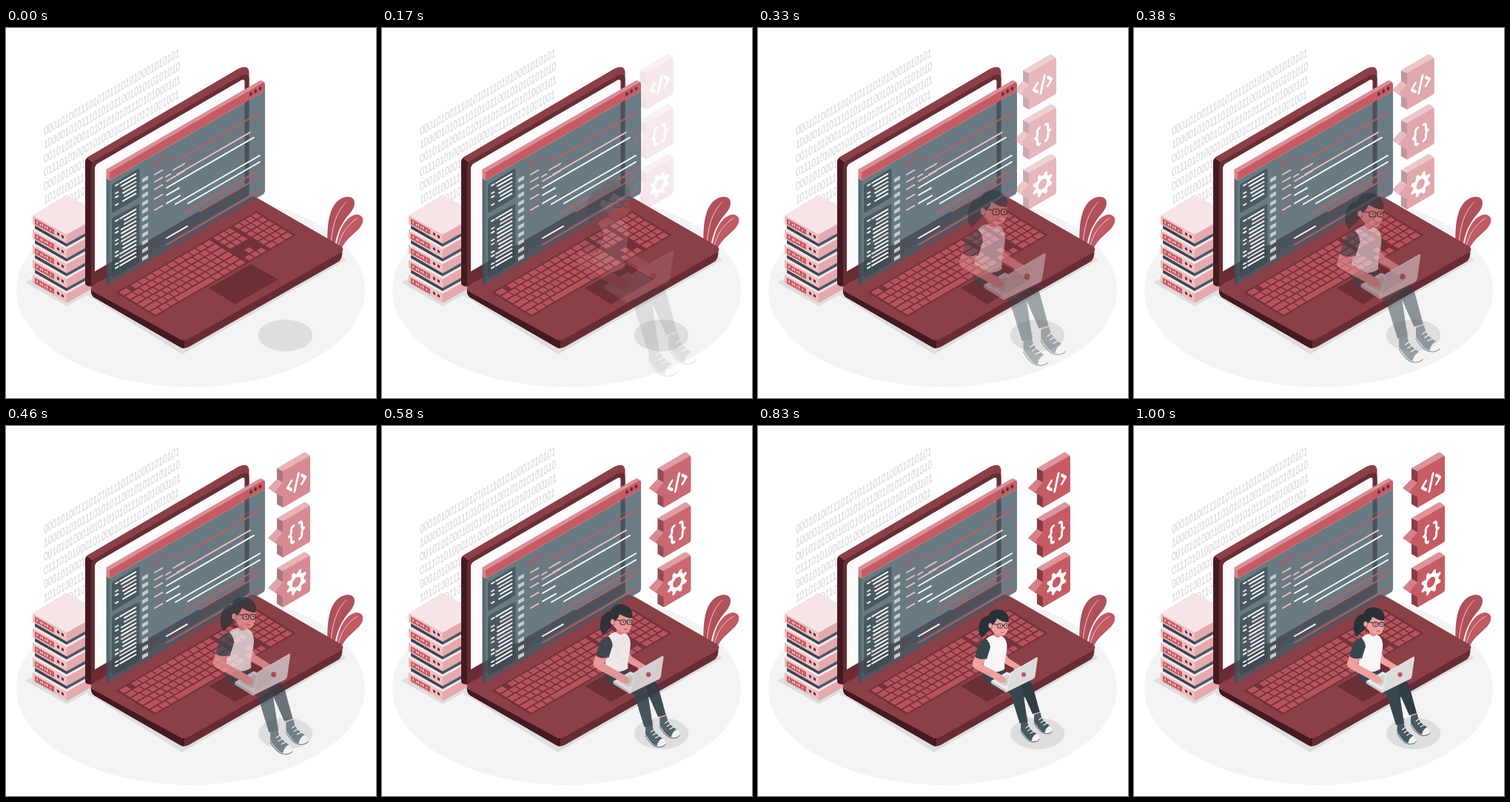
Animation of 500 by 500 pixels, one loop 1.04 s. Source, as an HTML page with a canvas:

```html
<!DOCTYPE html>
<html lang="en">
<head>
<meta charset="utf-8">
<title>Developer at work</title>
<style>
html, body { margin: 0; width: 100%; height: 100%; overflow: hidden; background: #fff; }
canvas { display: block; width: 500px; height: 500px; }
</style>
</head>
<body>
<canvas id="stage" width="500" height="500"></canvas>
<script>
const ISO = 0.577;
const RED = '#c65b64', PINK = '#edbfc3', MAROON = '#8b3f46', WINE = '#672c34', DARK = '#431a20';
const SLATE = '#37474f', SKIN = '#f0a09d', HAIR = '#263238';

function makeCanvas() {
  const c = document.createElement('canvas');
  c.width = c.height = 500;
  return c;
}

let g;
const fill = (d, color) => { g.fillStyle = color; g.fill(new Path2D(d)); };
const stroke = (d, color, w = 1) => {
  g.strokeStyle = color;
  g.lineWidth = w;
  g.lineCap = g.lineJoin = 'round';
  g.stroke(new Path2D(d));
};
const oval = (x, y, rx, ry, color, rot = 0) => {
  g.fillStyle = color;
  g.beginPath();
  g.ellipse(x, y, rx, ry, rot, 0, Math.PI * 2);
  g.fill();
};
const isoLine = (x, y, x2, color, w = 1.9) =>
  stroke(`M${x} ${y}L${x2} ${y - (x2 - x) * ISO}`, color, w);
function within(matrix, draw) {
  g.save();
  g.transform(...matrix);
  draw();
  g.restore();
}
function random(seed) {
  return () => (seed = (seed * 16807) % 2147483647) / 2147483647;
}

function drawBinary() {
  const rows = [
    '000101001110101011101010001010101', '100001010111010101100101010101010',
    '001010100010101010101110101000101', '011101010001010001011110101001001',
    '000101000101010001010101010100101', '101010011101010001010100010101010',
    '010010011010100101010001010101001'
  ];
  g.fillStyle = g.strokeStyle = '#dcdcdc';
  g.lineWidth = 0.4;
  g.font = '14px "Liberation Sans", Arial, sans-serif';
  rows.forEach((row, i) => within([0.725, -0.425, 0, 1.14, 51.2, 145.5 + i * 18.6], () => {
    g.fillText(row, 0, 0);
    g.strokeText(row, 0, 0);
  }));
}

function drawServer(y) {
  fill(`M36 ${y}L82 ${y + 26}V${y + 38.5}L36 ${y + 12}Z`, '#eebfc2');
  fill(`M82 ${y + 26}L130 ${y - 1}V${y + 11.5}L82 ${y + 38.5}Z`, '#e5a9ae');
  fill(`M82 ${y - 28}L130 ${y - 1}L82 ${y + 26}L36 ${y}Z`, '#f6e4e6');
  within([1, 0.565, 0, 1, 36, y], () => {
    g.fillStyle = RED;
    g.fillRect(3, 2.8, 26, 7.4);
    g.fillStyle = '#f7e2e4';
    [5.5, 10, 12.5, 16, 19, 23.5].forEach((x, i) => g.fillRect(x, 4.6 + (i % 2), 1.3, 3.4 - (i % 2)));
    oval(34.5, 6, 1.7, 2, WINE);
    oval(40.5, 6, 1.7, 2, WINE);
  });
}

function drawServers() {
  fill('M26 344L38 337L120 336V355L82 376Z', '#dfdfdf');
  for (let i = 4; i >= 0; i--) {
    const y = 253 + i * 20;
    drawServer(y);
    if (i) {
      fill(`M39 ${y - 9}L82 ${y + 15}V${y + 22.5}L39 ${y - 2}Z`, SLATE);
      fill(`M82 ${y + 15}L128 ${y - 11}V${y - 3}L82 ${y + 22.5}Z`, '#455a64');
    }
  }
}

function drawPlant() {
  fill('M435 297C433 270 435 231 461 228C474 228 473 240 466 249C454 262 446 277 443 302Z', '#b0505a');
  fill('M446 303C447 276 458 254 474 252C485 253 484 263 478 270C467 282 457 286 450 306Z', '#c05a63');
  stroke('M439 296C440 270 446 248 460 235', '#f3d3d6', 0.9);
  stroke('M448 301C450 282 460 266 475 257', '#f3d3d6', 0.9);
}

// Maps keyboard units (u along, v deep) to the stage.
const keyPoint = (u, v) => `${151 + u * 187 + v * 51} ${357 - u * 108 + v * 31.5}`;
const keyQuad = (u, v, u2, v2, color) =>
  fill(`M${keyPoint(u, v)}L${keyPoint(u2, v)}L${keyPoint(u2, v2)}L${keyPoint(u, v2)}Z`, color);

function keyRow(row, from, to, count) {
  const step = (to - from) / count;
  for (let i = 0; i < count; i++) {
    const u = from + i * step;
    keyQuad(u + 0.004, row / 6 + 0.018, u + step - 0.004, (row + 1) / 6 - 0.018, '#b8535c');
  }
}

function drawKeyboard() {
  keyQuad(-0.01, -0.02, 1.01, 1.02, '#73323b');
  keyRow(0, 0, 0.06, 1);
  keyRow(0, 0.085, 0.66, 11);
  keyRow(0, 0.68, 0.81, 3);
  keyRow(0, 0.83, 1, 4);
  for (let r = 1; r < 5; r++) {
    const inset = 0.045 + r * 0.012;
    keyRow(r, 0, inset, 1);
    keyRow(r, inset, 0.585, 11);
    keyRow(r, 0.585, 0.66, 1);
    keyRow(r, 0.83, 1, 4);
  }
  keyRow(1, 0.68, 0.81, 3);
  keyRow(2, 0.68, 0.81, 3);
  keyRow(4, 0.723, 0.767, 1);
  keyRow(5, 0, 0.17, 3);
  keyRow(5, 0.17, 0.44, 1);
  keyRow(5, 0.44, 0.66, 4);
  keyRow(5, 0.68, 0.81, 3);
  keyRow(5, 0.83, 1, 3);
}

function drawLaptop() {
  fill('M108 360L238 441L460 313L448 304L238 425L118 352Z', '#dedede');
  drawPlant();
  fill('M115 352Q114 360 119 364L235 431Q241 434 247 431L449 316Q455 312 454.500 300L330 240Z', WINE);
  fill('M115 352Q114 360 119 364L235 431Q238 433 241 433V415Z', DARK);
  fill('M115 352Q115 347 122 344L324 230Q333 225.500 341 230.500L452 294.500Q459 299 452 304L247 420Q240 424 234 420L119 357Q115 355 115 352Z', MAROON);
  drawKeyboard();
  fill('M275 352L331 320L367 340L310 373Z', '#6c2f36');
  stroke('M275 352L331 320L367 340', '#5b242c', 0.8);

  // lid
  fill('M107 181Q107 176.500 112 173.500L314 55Q328 48.500 328.500 60V90L116 349Q107 350 107 344Z', MAROON);
  fill('M107 181Q107 178 109 176L117 182V349Q107 350 107 344Z', DARK);
  fill('M115 349V188Q115 182 120 179L317 65Q328.500 59 328.500 69V226Z', WINE);
  fill('M120 329V190Q120 186 124 183L318 70.500Q322.500 68 322.500 73V212Z', '#fcfcfc');
}

function listing(y, rows, seed) {
  const rnd = random(seed);
  for (let i = 0; i < rows; i++) {
    const top = y + i * 5.3;
    const x = 154 + Math.floor(rnd() * 4) * 2;
    const color = i % 4 === 2 ? '#f3d9db' : '#fff';
    if (i % 3 !== 1) isoLine(148, top, 151.5, color);
    isoLine(x, top - (x - 148) * ISO, 175.5, color);
  }
}

function drawPanel() {
  fill('M140 206L350 85V219Q350 223 347 225L140 346Z', 'rgba(69,90,100,.8)');
  fill('M135.500 203L140 206V346Q135.500 348 135.500 344Z', 'rgba(60,82,92,.85)');
  fill('M135.500 191L344 70.500L350 73.500L140 194.500Z', '#dc8f96');
  fill('M135.500 191L140 194.500V206L135.500 204Z', '#d98188');
  fill('M140 194.500L347 74Q350 73 350 76V85L140 206Z', RED);
  [331, 337.2, 343.4].forEach(x => oval(x, 89 - (x - 331) * ISO, 1.8, 2.7, '#56313c', 0.3));

  const box = 'rgba(55,71,79,.62)';
  fill('M143 214Q143 211 146 209.500L178 190.500Q180.500 189 180.500 192V226Q180.500 229 178 230L146 249Q143 250.500 143 248Z', box);
  fill('M143 260Q143 257 146 255.500L178 238.500Q180.500 237 180.500 240V313Q180.500 316 178 318L146 337Q143 338.500 143 335Z', box);
  listing(213, 6, 71);
  listing(261, 13, 29);
  for (let i = 0; i < 11; i++) {
    const y = 204 + i * 10.6;
    fill(`M184 ${y}L192 ${y - 4.6}V${y + 0.4}L184 ${y + 5}Z`, '#c6cccf');
  }

  within([0.87, -0.5, 0, 1, 207, 180], () =>
    stroke('M-5-4L-9 0L-5 4M2-6L-2 6M5-4L9 0L5 4', '#b9505a', 1.6));
  isoLine(221, 179, 223, RED, 1.5);
  isoLine(226, 176, 229, RED, 1.5);
  isoLine(232, 178.500, 343, RED);
  [198, 208, 218, 231, 246].forEach(y => isoLine(201, y, 211.500, PINK));
  isoLine(216, 201, 222.500, PINK);
  isoLine(226, 192, 241, PINK);
  isoLine(217, 207, 241, PINK);
  isoLine(231, 198, 330, PINK);
  isoLine(217, 216, 335, '#fff');
  isoLine(217, 226, 234, '#fff');
  isoLine(217, 237, 235, '#fff');
  isoLine(229, 238, 343, '#fff');
  isoLine(246, 237, 343, '#fff');
  isoLine(240, 251, 343, RED);
  isoLine(262, 248, 343, RED);
  isoLine(217, 284, 245, '#fff');
  isoLine(217, 293, 343, RED);
}

function drawScene() {
  oval(249.5, 354.5, 235.5, 130.5, '#f4f4f4');
  drawBinary();
  drawServers();
  drawLaptop();
  drawPanel();
  oval(377.5, 415.5, 36.8, 21.5, '#dedede');
}

function drawGear() {
  const pts = [];
  for (let i = 0; i < 32; i++) {
    const a = (i + 1.5) * Math.PI / 16;
    const r = i % 4 < 2 ? 15.8 : 11.5;
    pts.push(`${r * Math.cos(a)} ${r * Math.sin(a)}`);
  }
  const gear = new Path2D('M' + pts.join('L') + 'Z');
  gear.moveTo(6.5, 0);
  gear.arc(0, 0, 6.5, 0, Math.PI * 2);
  g.fillStyle = '#fff';
  g.fill(gear, 'evenodd');
}

const icons = [
  () => stroke('M-8-6L-14 0L-8 6M3-10.500L-3 10.500M8-6L14 0L8 6', '#fff', 3.6),
  () => stroke('M-4.500-11C-10-11-7.500-5-8.500-2.500Q-9.500 0-11.500 0Q-9.500 0-8.500 2.500C-7.500 5-10-11-4.500 11'.replace('-10-11-4.500 11', '-10 11-4.500 11') +
    'M4.500-11C10-11 7.500-5 8.500-2.500Q9.500 0 11.500 0Q9.500 0 8.500 2.500C7.500 5 10 11 4.500 11', '#fff', 3.6),
  drawGear
];

function drawBubbles() {
  icons.forEach((icon, i) => within([1, 0, 0, 1, 0, i * 67.4], () => {
    fill('M375 57L383.500 61V110.500L375 105.500Z', '#873c45');
    fill('M375 57L411 36Q413 35 415 36.500L420 40.500L383.500 61.500Z', '#de949a');
    fill('M383 61L418 41Q420 40 420 43V86Q420 89 418 90L383 110.500Z', RED);
    fill('M363 84L375 71.500L383.500 76.500L371.500 90Z', '#d67f87');
    fill('M383.500 76.500L371.500 90L383.500 96.500Z', RED);
    within([0.87, -0.5, 0, 1, 401.5, 76.3], icon);
  }));
}

function drawShoe(x, y) {
  within([1, 0, 0, 1, x, y], () => {
    fill('M0 0L9-3C10 7 17 12 24 17C28 21 26 26 19 26.500C10 27 5 19 0 12Z', '#f4f4f4');
    fill('M0 0L9-3C10 7 16 11 22 15Q16 18 15 25C9 24 5 17 0 10Z', '#455a64');
    stroke('M0 12C5 20 9 26 18 26.500Q24 26 26 23', SLATE, 0.9);
    stroke('M7 7L11 4M9.500 11L14 8M13 14.500L18 12', '#fff', 1.1);
  });
}

function drawWoman() {
  fill('M314 254C303 252 296 262 297 274C297 280 300 284 301 285C305 279 312 277 314 268Z', HAIR);
  // legs
  fill('M356 395H366L364 408L357 409Z', SKIN);
  fill('M373 386H382L382 397L375 398Z', SKIN);
  drawShoe(355.5, 403.5);
  drawShoe(374, 392);
  fill('M318 333L362 341Q371 345 373 355L382 388L372 391L356 355Z', '#2f3e46');
  fill('M303 325C299 337 306 347 321 353L341 362L354 404L365 402L358 356C352 343 339 334 324 327Z', SLATE);
  // far arm and torso
  fill('M331 300L338 313L357 325L353 331L334 321L327 313Z', SKIN);
  fill('M318 272L328 276L328 284Q324 290 318 283Z', '#df8987');
  fill('M306 288C311 282 315 281 318 281Q322 287 328 282C335 284 337 293 336 300C335 309 332 318 333 328C325 334 311 334 302 328C306 317 303 300 306 288Z', '#f7f7f7');
  fill('M307 286C299 288 296 293 294 302L291 312Q299 318 308 314L313 298Q312 290 307 286Z', SLATE);
  // head
  fill('M312 258L338 259C339 270 337 280 331 282C323 282 315 276 313 270Z', SKIN);
  fill('M310 266C307 251 315 244 325 245C335 246 341 255 338 263C331 263 326 260 322 257C321 263 318 264 316 267L315 272Z', HAIR);
  oval(313, 267.5, 2.7, 3.5, SKIN);
  stroke('M315 265L323 266M330 267H332', '#2a2f38', 1);
  g.strokeStyle = '#2a2f38';
  g.lineWidth = 1;
  for (const [x, w] of [[323, 7], [332, 6]]) {
    g.beginPath();
    g.roundRect(x, 265, w, 6, 2);
    g.stroke();
    oval(x + w / 2 + 0.5, 267.7, 0.8, 1.1, HAIR);
  }
  stroke('M328 277Q330 278 332 277', '#b64c55', 1);
  // small computer
  fill('M313.500 345L336 332L358 342L336 359Z', '#e9e9e9');
  fill('M313.500 345L336 358L335 361L314 348Z', '#c8c8c8');
  fill('M320 345L336 336L349 342L334 352Z', '#cfd2d4');
  // near arm
  fill('M291 311Q299 317 307 313L302 322L326 335Q334 339 335 345Q334 349 328 347L294 329Q286 325 288 320Z', SKIN);
  oval(350, 328, 4.5, 3, SKIN, -0.3);
  fill('M341 333.500L377 312.500Q379.500 311 379 314L375.500 338Q375 341 373 342L335.500 360.500Z', '#dcdcdc');
  stroke('M335.500 360L341 333.500L378 312', '#f4f4f4', 0.9);
  oval(359.5, 336, 3.1, 3.1, '#bd525c');
}

// Eased progress along cubic-bezier(.36,-.01,.5,1.38)
function ease(x) {
  const curve = (s, a, b) => 3 * a * s * (1 - s) ** 2 + 3 * b * s * s * (1 - s) + s ** 3;
  let lo = 0, hi = 1;
  for (let i = 0; i < 24; i++) {
    const mid = (lo + hi) / 2;
    if (curve(mid, 0.36, 0.5) < x) lo = mid; else hi = mid;
  }
  return curve(hi, -0.01, 1.38);
}

const LOOP = 1040, FPS = 24;
const stage = document.getElementById('stage').getContext('2d');
const scene = makeCanvas(), layer = makeCanvas();
const layerCtx = layer.getContext('2d');

g = scene.getContext('2d');
drawScene();

function fadeIn(alpha, matrix, draw) {
  g = layerCtx;
  g.clearRect(0, 0, 500, 500);
  within(matrix, draw);
  stage.globalAlpha = alpha;
  stage.drawImage(layer, 0, 0);
  stage.globalAlpha = 1;
}

function render(ms) {
  const step = Math.min(24, Math.floor((ms % LOOP + 4) * FPS / 1000));
  const p = step ? ease(Math.min(1, (step + 0.5) / FPS)) : 0;
  const alpha = Math.max(0, Math.min(1, p));
  const k = 1.5 - 0.5 * p;
  stage.fillStyle = '#fff';
  stage.fillRect(0, 0, 500, 500);
  stage.drawImage(scene, 0, 0);
  fadeIn(alpha, [1, 0, 0, 1, -30 * (1 - p), 0], drawBubbles);
  fadeIn(alpha, [k, 0, 0, k, 344.5 * (1 - k), 337 * (1 - k)], drawWoman);
}

const start = performance.now();
function tick() {
  render(performance.now() - start);
  requestAnimationFrame(tick);
}
tick();
</script>
</body>
</html>
```
